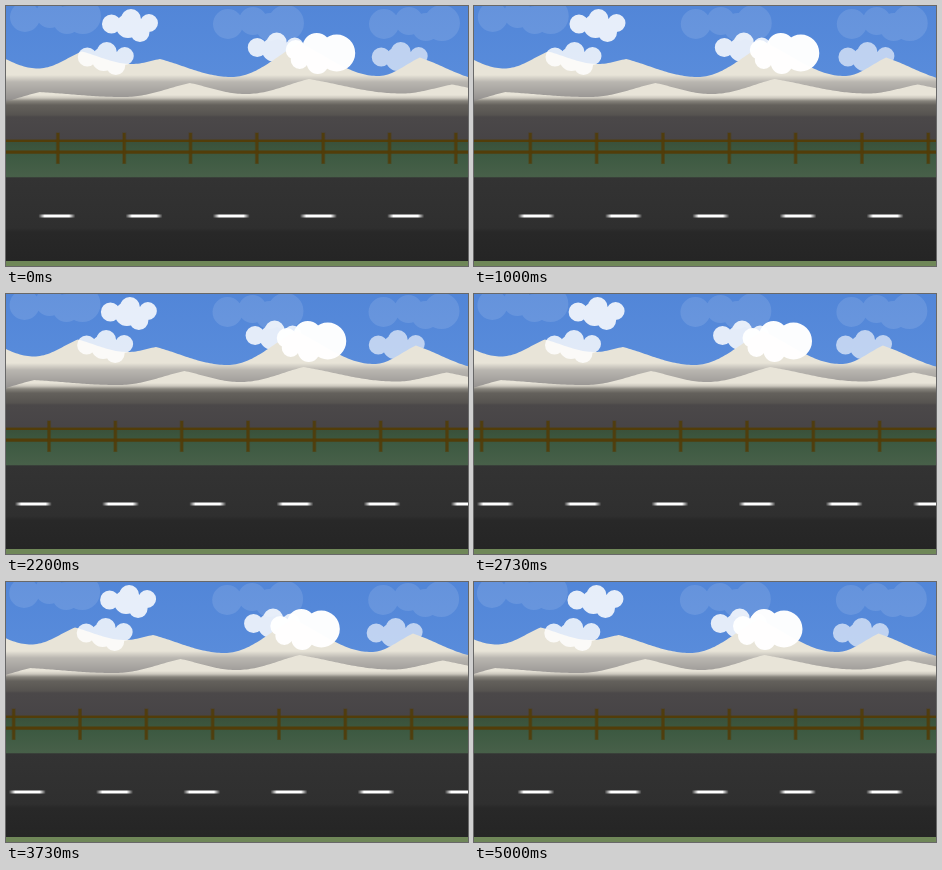
An HTML page with a canvas for the animation above (5070 ms loop, 462x260 px).

```html
<!DOCTYPE html>
<html lang="en">
<head>
<meta charset="utf-8">
<title>Road</title>
<style>
html, body { margin: 0; width: 100%; height: 100%; overflow: hidden; background: #323232; }
canvas { display: block; width: 100%; height: 100%; }
</style>
</head>
<body>
<canvas id="stage" width="462" height="260"></canvas>
<script>
const W = 462, H = 260, LOOP = 5070, FPS = 15;
const ctx = document.getElementById('stage').getContext('2d');

// Vertical gradient from [y, colour] stops
function vertical(...stops) {
  const top = stops[0][0], span = stops[stops.length - 1][0] - top;
  const g = ctx.createLinearGradient(0, top, 0, top + span);
  for (const [y, color] of stops) g.addColorStop((y - top) / span, color);
  return g;
}

const sky = vertical([0, '#5286d8'], [75, '#598cdb']);
const farFill = vertical([69, '#e8e4d8'], [76, '#b9b6b0'], [93, '#979492'], [100, '#5c5955']);
const nearFill = vertical([89, '#e8e4d8'], [92, '#cbc7bd'], [95, '#86837c'],
  [99, '#64615c'], [109, '#565350'], [111, '#4b4849'], [134, '#474446']);
const grass = vertical([134, '#3a5039'], [150, '#3d5a42'], [171, '#486049']);
const road = vertical([171, '#333333'], [222, '#2f2f2f'], [226, '#282828'], [255, '#252525']);
const wood = '#523d09';

// Alternating peaks and valleys
const farRidge = [[-20, 44], [32, 62.5], [76, 45.5], [126, 58], [154, 53],
  [226, 71], [294, 37], [372, 70], [414, 51.5], [490, 76]];
const nearRidge = [[-30, 100], [34, 86], [118, 91], [184, 77], [240, 88],
  [303, 73], [396, 87.5], [446, 78.5], [500, 87]];

// Lobes: x, y, radius
const puff = [[9.5, 15, 9.5], [29, 10, 10], [47, 14, 9], [38, 23.5, 9.5], [26, 17, 12]];
const bigPuff = [[10, 17, 10], [14, 27, 9], [31, 14, 14], [51, 20, 18.5], [32, 30, 11]];
const haze = [[16, 17, 15], [41, 14, 14], [74, 16, 18], [58, 20, 14]];

function rect(fill, x, y, w, h) {
  ctx.fillStyle = fill;
  ctx.fillRect(x, y, w, h);
}

// Round in the valley, slightly pointed at the peak
const slope = u => (1 - Math.cos(2.3 * u)) / (1 - Math.cos(2.3));

function ridge(points, shift, fill, bottom) {
  ctx.beginPath();
  ctx.moveTo(points[0][0] - shift, bottom);
  for (let i = 1; i < points.length; i++) {
    const pair = [points[i - 1], points[i]].sort((a, b) => b[1] - a[1]);
    const [valley, peak] = pair;
    for (let x = points[i - 1][0]; x <= points[i][0]; x += 2) {
      const u = (x - valley[0]) / (peak[0] - valley[0]);
      ctx.lineTo(x - shift, valley[1] + (peak[1] - valley[1]) * slope(u));
    }
  }
  ctx.lineTo(W + 20, bottom);
  ctx.fillStyle = fill;
  ctx.fill();
}

function cloud(lobes, x, y, alpha) {
  ctx.beginPath();
  for (const [cx, cy, r] of lobes) {
    ctx.moveTo(x + cx + r, y + cy);
    ctx.arc(x + cx, y + cy, r, 0, Math.PI * 2);
  }
  ctx.fillStyle = `rgba(255,255,255,${alpha})`;
  ctx.fill();
}

// Calls draw(x) for every repeat of a part that crosses the stage
function repeat(start, gap, draw) {
  for (let x = ((start % gap) + gap) % gap - gap; x < W + gap; x += gap) draw(x);
}

function post(x) {
  ctx.globalAlpha = 0.45;
  rect(wood, x - 2, 126.5, 4, 31.5);
  ctx.globalAlpha = 0.85;
  rect(wood, x - 1.2, 127, 2.4, 30.5);
  ctx.globalAlpha = 1;
}

function dash(x) {
  const g = ctx.createLinearGradient(x - 1, 0, x + 36, 0);
  g.addColorStop(0, 'rgba(255,255,255,0)');
  g.addColorStop(0.17, '#fff');
  g.addColorStop(0.83, '#fff');
  g.addColorStop(1, 'rgba(255,255,255,0)');
  rect(g, x - 1, 208.5, 37, 3);
}

function draw(time) {
  const step = Math.max(1, Math.floor(time * FPS / 1000 + 0.06));
  rect(sky, 0, 0, W, 100);
  cloud(haze, 3 - 0.015 * step, -6, 0.11);
  cloud(haze, 206 - 0.015 * step, 1, 0.11);
  cloud(haze, 362 - 0.015 * step, 1, 0.11);
  cloud(puff, 241.8 - 0.067 * step, 26.5, 0.84);
  cloud(puff, 365.8 - 0.092 * step, 36, 0.62);

  ridge(farRidge, 0.125 * step, farFill, 110);
  ridge(nearRidge, 0.17 * step, nearFill, 135);
  cloud(puff, 96 - 0.034 * step, 3, 0.86);
  cloud(puff, 71.8 - 0.02 * step, 36, 0.82);
  cloud(bigPuff, 280 - 0.28 * step, 27, 0.98);

  rect(grass, 0, 134, W, 38);
  rect(wood, 0, 133.6, W, 2.4);
  rect(wood, 0, 144.5, W, 3.2);
  repeat(56.3 - 4.422 * step, 66.33, post);

  rect(road, 0, 171.3, W, 84);
  repeat(45 - 11.635 * step, 87.2, dash);
  rect('#6f8758', 0, 255, W, H - 255);
}

let start = null;
function tick(now) {
  if (start === null) start = now;
  draw((now - start) % LOOP);
  requestAnimationFrame(tick);
}
draw(0);
requestAnimationFrame(tick);
</script>
</body>
</html>
```
